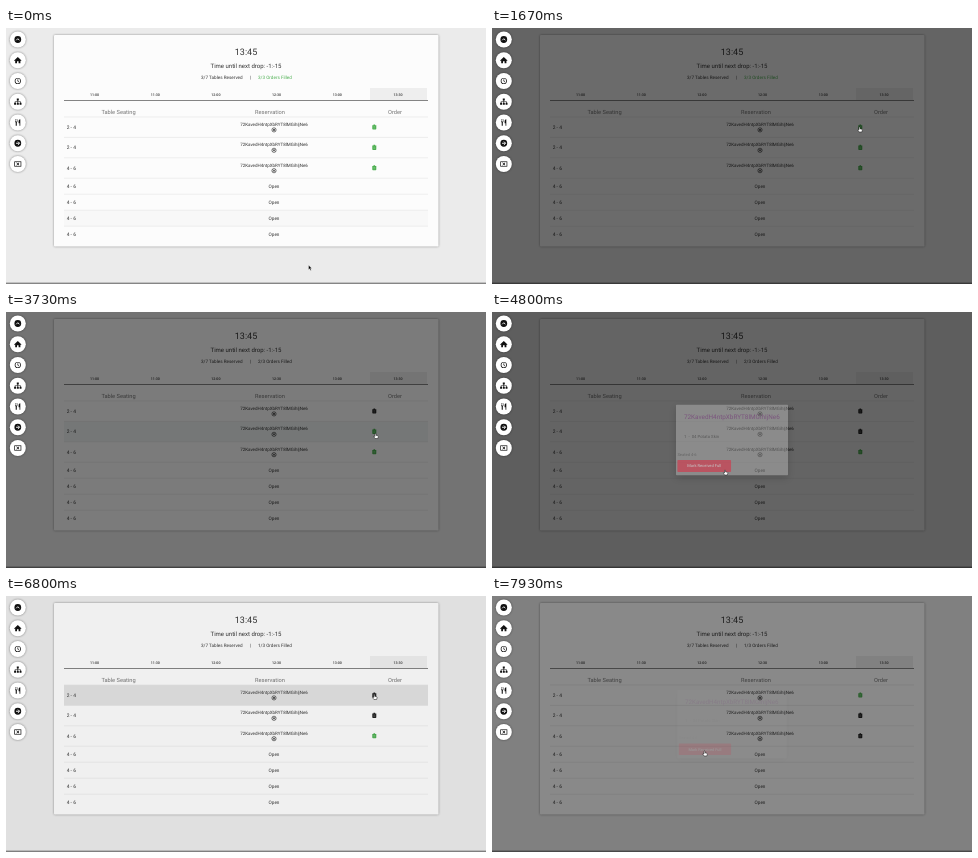
An HTML page for the animation above (8000 ms loop, 480 by 256 pixels).

```html
<!DOCTYPE html>
<html lang="en">
<head>
<meta charset="utf-8">
<title>Table reservations</title>
<style>
  html, body { margin: 0; width: 100%; height: 100%; overflow: hidden; background: #ebebeb; }
  svg { display: block; width: 100%; height: 100%; }
  text { font-family: Roboto, Arial, sans-serif; text-rendering: geometricPrecision; white-space: pre; }
  #card { filter: drop-shadow(0 .8px 1.2px rgba(0, 0, 0, .4)); }
  #side circle.disc { filter: drop-shadow(0 .8px .8px rgba(0, 0, 0, .45)); }
  #box { filter: drop-shadow(0 3px 4px rgba(0, 0, 0, .6)); }
</style>
</head>
<body>
<svg id="stage" viewBox="0 0 480 256">
  <rect width="480" height="256" fill="#ebebeb"/>
  <rect y="254.6" width="480" height="1.4" fill="#858585"/>
  <g id="page"><rect id="card" x="48" y="7" width="384.5" height="211.5" rx="1" fill="#fcfcfc"/></g>
  <rect id="shade" width="480" height="256"/>
  <g id="modal"></g>
  <g id="side"></g>
  <g id="cursor" stroke-linejoin="round"></g>
</svg>
<script>
const LOOP = 8000, STEP = 200 / 3;
const GREEN = '#4caf50', DARK = '#222';
const GUEST = '72KavedH4ntpXbRYT8lMGihIjNe6';
const $ = id => document.getElementById(id);

function add(parent, tag, attrs) {
  const el = document.createElementNS('http://www.w3.org/2000/svg', tag);
  for (const key in attrs) el.setAttribute(key, attrs[key]);
  return parent.appendChild(el);
}

function label(parent, str, x, y, size, attrs) {
  const el = add(parent, 'text', {
    x, y: y + size * .36, 'font-size': size, 'text-anchor': 'middle', fill: '#333', ...attrs
  });
  el.textContent = str;
  return el;
}

const line = (y, color, width) =>
  add(page, 'path', { d: `M58 ${y}H422`, stroke: color, 'stroke-width': width });

const page = $('page'), modal = $('modal'), side = $('side'), cursor = $('cursor');

// Heading
label(page, '13:45', 240, 24, 9);
label(page, 'Time until next drop: -1:-15', 240, 37.5, 6);
const tables = label(page, '', 195, 49.5, 4.6, { 'text-anchor': 'start' });
label(page, '|', 244.3, 49.3, 4.6);
const orders = label(page, '', 252, 49.5, 4.6, { 'text-anchor': 'start' });

// Time tabs
add(page, 'rect', { x: 364, y: 60, width: 57, height: 12, fill: '#eee' });
['11:00', '11:30', '12:00', '12:30', '13:00', '13:30'].forEach((time, i) =>
  label(page, time, 88.5 + i * 60.7, 66.3, 3.6, { 'font-weight': 500 }));
line(72.5, '#666', .8);

// Table
[['Table Seating', 112.5], ['Reservation', 264], ['Order', 389]].forEach(([name, x]) =>
  label(page, name, x, 84, 5.7, { fill: '#757575' }));

const rowTop = i => i < 3 ? 89 + i * 20.4 : 150.2 + (i - 3) * 16;
const hover = add(page, 'rect', { x: 58, width: 364 });
const bins = [];
for (let i = 0; i < 7; i++) {
  const booked = i < 3, top = rowTop(i), mid = top + (booked ? 10.2 : 7.8);
  line(top, '#e2e2e2', .6);
  label(page, i < 2 ? '2 - 4' : '4 - 6', 65.3, mid, 4.9);
  if (!booked) {
    label(page, 'Open', 268, mid, 4.7);
    continue;
  }
  label(page, GUEST, 268, mid - 3, 4.5);
  add(page, 'circle', { cx: 268, cy: mid + 2.7, r: 2.1, fill: 'none', stroke: DARK, 'stroke-width': .6 });
  add(page, 'path', { d: `M267 ${mid + 1.7}l2 2m0 -2l-2 2`, stroke: DARK, 'stroke-width': .8 });
  const bin = add(page, 'g', { transform: `translate(368.3 ${mid - .2})` });
  add(bin, 'path', { d: 'M-2 -1.8H2V1.8Q2 2.5 1.3 2.5H-1.3Q-2 2.5 -2 1.8ZM-.8 -2.6H.8V-1.5H-.8Z' });
  add(bin, 'path', { d: 'M-.9 -.3H.9M-.9 1H.9', stroke: '#fff', 'stroke-width': .35, opacity: .6 });
  bins.push(bin);
}

// Order dialog
add(modal, 'rect', { id: 'box', x: 179.5, y: 90, width: 121, height: 76, rx: .8, fill: '#fff' });
label(modal, '1  -  04 Potato Skin', 188, 123.7, 4.6, { 'text-anchor': 'start' });
label(modal, 'Seated 4-6', 181, 143.5, 4.4, { 'text-anchor': 'start', fill: '#666' });
const strong = add($('stage'), 'g', {});
modal.after(strong);
label(strong, GUEST, 188, 103, 6.9, { 'text-anchor': 'start', fill: '#6b2070' });
add(strong, 'rect', { x: 181, y: 149.5, width: 58, height: 13, rx: .8, fill: '#e8203a' });
label(strong, 'Mark Received Full', 210, 156, 4.4, { fill: '#fff' });

// Side buttons: black shapes, then white details
const icons = [
  ['M-3.4 0A3.4 3.4 0 1 1 3.4 0A3.4 3.4 0 1 1 -3.4 0Z', 'M-1.6 .8L0 -.8L1.6 .8'],
  ['M-3.7 .2L0 -3.2L3.7 .2L3.1 .7L2.6 .3V3H.8V.9H-.8V3H-2.6V.3L-3.1 .7Z', ''],
  ['M-3.1 0A3.1 3.1 0 1 1 3.1 0A3.1 3.1 0 1 1 -3.1 0Z', 'M-2.4 0A2.4 2.4 0 1 1 2.4 0A2.4 2.4 0 1 1 -2.4 0Z'],
  ['M-1 -3.2H1V-1.2H.3V-.3H3V1H3.7V3H1.8V1H2.4V.3H.3V1H1V3H-1V1H-.3V.3H-2.4V1H-1.8V3H-3.7V1H-3V-.3H-.3V-1.2H-1Z', ''],
  ['M-2.8 -3.2H-.4V-.8L-1 .1V3.3H-2.1V.1L-2.8 -.8ZM.8 3.3V-1.5Q.9 -3.3 2.5 -3.3V3.3H1.7V.8H.8Z', 'M-2 -3.2V-1M-1.2 -3.2V-1'],
  ['M-3.4 0A3.4 3.4 0 1 1 3.4 0A3.4 3.4 0 1 1 -3.4 0Z', 'M-1.8 0H1.7M.1 -1.7L1.8 0L.1 1.7'],
  ['M-3.5 -2.6H3.5V2.6H-3.5Z', 'M-2.8 -1.9H2.8V1.9H-2.8Z']
];
icons.forEach(([shape, detail], i) => {
  const g = add(side, 'g', { transform: `translate(11.8 ${11.5 + i * 20.75})` });
  add(g, 'circle', { class: 'disc', r: 8, fill: '#fff' });
  add(g, 'path', { d: shape, fill: '#111' });
  const filled = i === 2 || i === 6;
  add(g, 'path', { d: detail, fill: filled ? '#fff' : 'none', stroke: '#fff', 'stroke-width': filled ? 0 : .9 });
  if (i === 2) add(g, 'path', { d: 'M0 -1.7V.2L1.2 .9', fill: 'none', stroke: '#111', 'stroke-width': .7 });
  if (i === 6) add(g, 'path', { d: 'M-1.2 -1.1L1.2 1.1M1.2 -1.1L-1.2 1.1', stroke: '#111', 'stroke-width': .9 });
});

// Pointer shapes, tip at the origin
const arrow = add(cursor, 'path', {
  d: 'M0 0V4.8L1.1 3.8L1.9 5.6L2.8 5.2L2 3.5H3.4Z', fill: '#000', stroke: '#fff', 'stroke-width': .4
});
const hand = add(cursor, 'path', {
  d: 'M-.5 .3Q0 -.4 .5 .3V1.8L2.5 2.3Q3 2.5 2.8 3.3L2.3 5H-.4L-1.9 2.9Q-1.7 2.2 -.5 3Z',
  fill: '#fff', stroke: '#111', 'stroke-width': .5
});

// Motion
const route = [
  [0, 302.5, 237], [67, 302.5, 237], [330, 261, 96], [500, 261, 96], [1330, 367.5, 99],
  [1720, 367.5, 99], [2130, 300, 132], [2300, 300, 132], [2640, 219.5, 158], [2740, 219.5, 158],
  [3130, 345, 109], [3400, 369.5, 121.5], [3740, 369.5, 121.5], [4200, 310, 135], [4370, 310, 135],
  [4730, 233, 158], [4810, 233, 158], [5200, 262, 146], [5700, 374, 141], [6070, 371, 118],
  [6500, 368.3, 98.5], [6900, 368.3, 98.5], [7750, 212.5, 155], [LOOP, 212.5, 155]
];
const dialogs = [[1440, 2648], [3570, 4745], [6791, 7823]];

const clamp = u => Math.min(1, Math.max(0, u));
const easeOut = u => 1 - (1 - clamp(u)) ** 3;
const smooth = u => u * u * (3 - 2 * u);

function pointerAt(t) {
  const i = Math.max(1, route.findIndex(p => p[0] > t));
  const [t0, x0, y0] = route[i - 1], [t1, x1, y1] = route[i];
  const u = smooth(clamp((t - t0) / (t1 - t0)));
  return [x0 + (x1 - x0) * u, y0 + (y1 - y0) * u];
}

function hoverAt(t) {
  if (t < 1460) return [5, '#000', .015];
  if (t > 3570 && t < 4200) return [1, '#066', .05];
  if (t > 6130 && t < 7000) return [0, '#000', .1];
  return [0, '#000', 0];
}

function draw(t) {
  let shade = 0, shown = 0;
  for (const [open, close] of dialogs) {
    if (t < open) continue;
    shade = .6 * (easeOut((t - open) / 350) - easeOut((t - close - 80) / 350));
    shown = easeOut((t - open - 230) / 150) - easeOut((t - close) / 150);
  }
  $('shade').setAttribute('opacity', shade);
  const scale = `translate(240 128) scale(${.9 + .1 * shown}) translate(-240 -128)`;
  for (const [g, alpha] of [[modal, shown], [strong, Math.sqrt(Math.max(0, shown))]]) {
    g.setAttribute('opacity', alpha);
    g.setAttribute('transform', scale);
  }

  const filled = t < 3195 ? 3 : t < 5260 ? 2 : 1;
  tables.textContent = '3/7 Tables Reserved';
  orders.textContent = filled + '/3 Orders Filled';
  orders.setAttribute('fill', filled === 3 ? GREEN : '#333');
  const done = [t < 2648 || t > 7823, t < 4745, t < 7000];
  bins.forEach((bin, i) => bin.setAttribute('fill', done[i] ? GREEN : DARK));

  const [row, tint, alpha] = hoverAt(t);
  hover.setAttribute('y', rowTop(row));
  hover.setAttribute('height', rowTop(row + 1) - rowTop(row));
  hover.setAttribute('fill', tint);
  hover.setAttribute('opacity', alpha);

  const [x, y] = pointerAt(t);
  const overBin = x > 365 && x < 372 && bins.some((_, i) => Math.abs(y - rowTop(i) - 10.5) < 3.5);
  const overButton = shade > .1 && x < 239 && y > 149;
  cursor.setAttribute('transform', `translate(${x} ${y})`);
  hand.setAttribute('visibility', overBin || overButton ? 'visible' : 'hidden');
  arrow.setAttribute('visibility', overBin || overButton ? 'hidden' : 'visible');
}

const start = performance.now();
function tick() {
  const t = (performance.now() - start) % LOOP;
  draw(Math.floor((t + 5) / STEP) * STEP % LOOP);
  requestAnimationFrame(tick);
}
tick();
</script>
</body>
</html>
```
